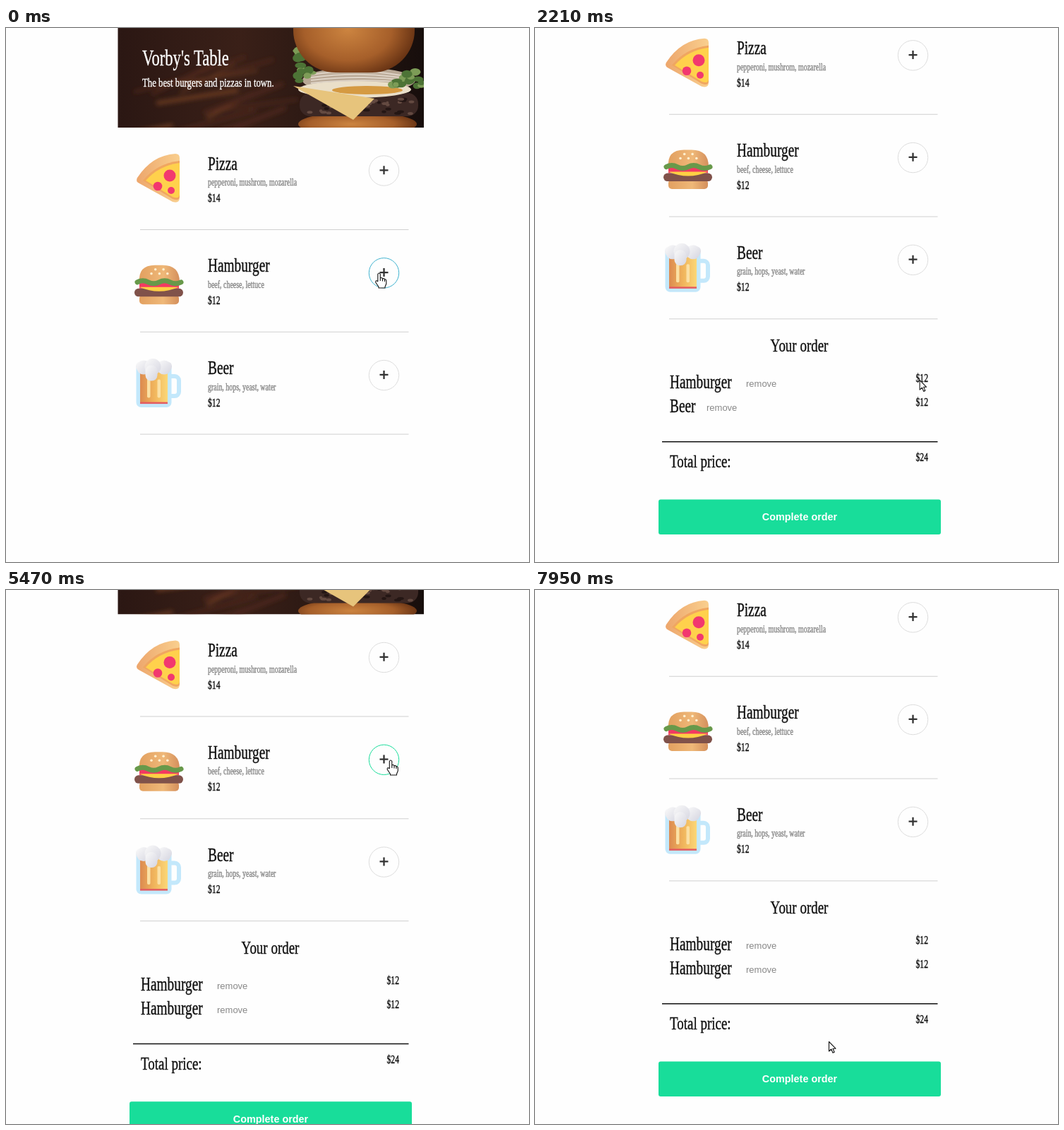
Write an HTML page that moves like this. It is 741 px wide and 756 px high and loops after 8000 ms.

```html
<!DOCTYPE html>
<html lang="en">
<head>
<meta charset="utf-8">
<title>Menu order</title>
<style>
  html, body { margin: 0; width: 100%; height: 100%; overflow: hidden; background: #fefefe; }
  svg { display: block; width: 741px; height: 756px; }
  .menu { font-family: "Liberation Serif", "Noto Serif", serif; stroke-width: .4px; }
  .ui { font-family: "Liberation Sans", Roboto, sans-serif; }
</style>
</head>
<body>
<svg viewBox="0 0 741 756" xmlns="http://www.w3.org/2000/svg">
  <defs>
    <linearGradient id="wood"><stop stop-color="#2b1713"/><stop offset=".4" stop-color="#3a2018"/><stop offset="1" stop-color="#170e0c"/></linearGradient>
    <radialGradient id="bun" cx=".45" cy=".5" r=".6"><stop stop-color="#cc8440"/><stop offset=".6" stop-color="#a65f2a"/><stop offset="1" stop-color="#5e2c10"/></radialGradient>
    <linearGradient id="crust"><stop stop-color="#eda66c"/><stop offset="1" stop-color="#f9cf8e"/></linearGradient>
    <linearGradient id="bread"><stop stop-color="#e2a060"/><stop offset=".6" stop-color="#efb878"/><stop offset="1" stop-color="#d48f5c"/></linearGradient>
    <linearGradient id="ale"><stop stop-color="#dc8a50"/><stop offset=".5" stop-color="#f0b45c"/><stop offset="1" stop-color="#fbd777"/></linearGradient>
    <linearGradient id="foam" x2="1" y2="1"><stop stop-color="#fafafa"/><stop offset="1" stop-color="#d5d5e0"/></linearGradient>
    <clipPath id="banner"><path d="M158.500 0H592V141H158.500z"/></clipPath>
    <filter id="soft"><feGaussianBlur stdDeviation="3"/></filter>
  </defs>
  <g id="page">
    <g id="photo" clip-path="url(#banner)"></g>
    <g id="heading"></g>
    <g id="rows"></g>
    <g id="order"></g>
  </g>
  <g id="cursor" fill="#fff" stroke="#111" stroke-width="1.100" stroke-linejoin="round">
    <path id="arrow" d="M.5 .5V14L3.700 11L6 16.300L8.200 15.300L6 10.200H10z"/>
    <path id="hand" d="M-1.700 12V1.500Q0-1.500 1.800 1.500V7Q4.500 5.800 5 8Q7.500 7 8 9Q10 8.500 10.300 10.500V15L8.500 19.500V21H-.5V19.500L-4.800 13Q-5 9-1.700 12M1.800 7V11M5 8V11.500M8 9V12"/>
  </g>
</svg>
<script>
const LOOP = 8000, VIEW = 756, ROW = 144.8, ITEM = 34.5;
const RING = { x: 535.5, y: 202, r: 21.2 };
const BUTTON = { x: 175, y: 796.25, w: 400, h: 49.5 };
const GREEN = '#18dd9a', DARK_GREEN = '#35896a', BLUE = '#3fb3d0';
const $ = id => document.getElementById(id);
const repeat = (n, draw) => Array.from({ length: n }, (_, i) => draw(i)).join('');

const path = (fill, d) => `<path fill="${fill}" d="${d}"/>`;
const rect = (fill, x, y, w, h, r = 0) =>
  `<rect fill="${fill}" x="${x}" y="${y}" width="${w}" height="${h}" rx="${r}"/>`;
const oval = (fill, x, y, rx, ry = rx) =>
  `<ellipse fill="${fill}" cx="${x}" cy="${y}" rx="${rx}" ry="${ry}"/>`;
const line = (x, y, color, width) =>
  `<path d="M${x} ${y}H570.5" stroke="${color}" stroke-width="${width}"/>`;
// One condensed display face for the whole menu.
const label = (x, y, size, text, color = '#111', anchor = 'start') =>
  `<text class="menu" transform="translate(${x} ${y}) scale(.73 1)" font-size="${size}" fill="${color}" stroke="${color}" text-anchor="${anchor}">${text}</text>`;

let seed = 7;
const random = () => (seed = seed * 16807 % 2147483647) / 2147483647;
const between = (a, b) => a + (b - a) * random();

function photo() {
  const streaks = repeat(14, i => {
    const x = between(150, 340), y = between(40, 165);
    return `<path d="M${x} ${y}l${between(60, 150)} ${-between(10, 45)}" stroke="${i % 3 ? '#4d281b' : '#6b3a20'}" stroke-width="${between(2, 6)}"/>`;
  });
  const leaves = (x, y, w, h) => repeat(16, i =>
    oval(i % 3 ? '#4d7336' : '#7d9c57', x + between(0, w), y + between(0, h), between(4, 8), between(3, 6)));
  const crumbs = repeat(40, i =>
    oval(i % 2 ? '#241614' : '#644a41', between(430, 575), between(100, 121), between(2, 5), 2));
  return rect('url(#wood)', 158, 0, 434, 141) + `<g filter="url(#soft)">${streaks}</g>` +
    oval('url(#bun)', 498, 136, 84, 17) + rect('#3c2824', 416, 92, 168, 33, 15) + crumbs +
    oval('#b9a895', 500, 74, 80, 18) + oval('#eadfc9', 494, 87, 80, 12) + oval('#d59a42', 512, 88, 50, 6) +
    path('#e7c47c', 'M407 82L522 100L492 130z') +
    `<g fill="none" stroke="#ded3c6" stroke-width="2">${repeat(4, i =>
      `<path d="M432 ${66 + 4 * i}Q500 ${56 + 5 * i} 566 ${68 + 3 * i}"/>`)}</g>` +
    leaves(412, 32, 22, 46) + leaves(535, 60, 56, 22) + rect('url(#bun)', 407, -58, 172, 121, 60);
}

function wavyBand(fill, x, y, w, h, waves) {
  const step = w / waves / 2;
  const swing = repeat(waves, () => `q${step / 2} -4 ${step} 0t${step} 0`);
  return `<path fill="none" stroke="${fill}" stroke-width="${h}" stroke-linecap="round" d="M${x} ${y}${swing}"/>`;
}

// Icons share the first row's coordinates.
const pizza = path('url(#crust)', 'M246 184Q246 178 240 178Q207 180 186 212Q183 217 189 220L236 246Q246 249 246 240z') +
  path('#f0a660', 'M246 188Q213 192 194 216L236 242Q246 246 246 238z') +
  path('#ffd14c', 'M246 191Q216 195 198 216L236 239Q246 243 246 235z') +
  oval('#f2386f', 232, 209, 8.5) + oval('#f2386f', 215, 224, 6.3) + oval('#f2386f', 234, 230, 5);
const burger = path('url(#bread)', 'M189 215Q187 191 211 191H222Q246 191 246 215z') +
  repeat(5, i => oval('#fff0d0', 206 + 5.7 * i, i % 2 ? 197 : 203, 1.8)) +
  rect('#f23a62', 189, 215, 56, 9) + wavyBand('#68994a', 186, 215, 62, 7, 2) +
  rect('url(#bread)', 189, 233, 56, 13.5, 5) + rect('#80524a', 182, 224, 69, 11.5, 5.7) +
  path('#ffd044', 'M189 222H245Q217 234 189 222z');
const beer = `<rect x="222" y="203.500" width="23" height="28" rx="6" fill="none" stroke="#c3e8fb" stroke-width="6"/>` +
  rect('#c3e8fb', 184.5, 186, 50, 61.5, 7) + rect('url(#ale)', 190, 195, 39, 47) + rect('#e35c62', 190, 240, 39, 2.5) +
  rect('#fbe0a4', 200, 195, 4.5, 39, 2) + rect('#fbe0a4', 214.5, 208, 4.5, 26, 2) +
  rect('url(#foam)', 184, 183, 51, 13, 6) + oval('url(#foam)', 195, 191, 10) + oval('url(#foam)', 224, 191, 10) +
  oval('url(#foam)', 208, 190, 11.5) + rect('url(#foam)', 197.5, 188, 17, 22, 8);

const menu = [
  ['Pizza', 'pepperoni, mushrom, mozarella', '$14', pizza],
  ['Hamburger', 'beef, cheese, lettuce', '$12', burger],
  ['Beer', 'grain, hops, yeast, water', '$12', beer]
];
$('photo').innerHTML = photo();
$('heading').innerHTML = label(193, 53, 31, "Vorby's Table", '#fff') +
  label(193, 83, 17.5, 'The best burgers and pizzas in town.', '#fff');
$('rows').innerHTML = repeat(menu.length, i => {
  const [name, detail, price, icon] = menu[i];
  return `<g transform="translate(0 ${i * ROW})">${icon}
    ${label(286, 200.5, 26.5, name)}${label(286, 223, 13.6, detail, '#858585')}${label(286, 246, 16, price)}
    <circle class="ring" cx="${RING.x}" cy="${RING.y}" r="${RING.r}" fill="none"/>
    <path d="M${RING.x - 6} ${RING.y - .7}h12m-6-6v12" stroke="#333" stroke-width="2.300"/>
    ${line(190, 285.5, '#d0d0d0', 1)}</g>`;
});
const rings = [...document.querySelectorAll('.ring')];

function orderMarkup(items) {
  if (!items.length) return '';
  const lines = repeat(items.length, i => `<g transform="translate(0 ${i * ITEM})">
    ${label(191, 673, 26.5, items[i])}${label(557, 664, 16, '$12', '#111', 'end')}
    <text class="ui" x="${items[i] === 'Beer' ? 243 : 299}" y="671" font-size="13" fill="#888">remove</text></g>`);
  return label(374.5, 621, 26, 'Your order', '#111', 'middle') + lines +
    `<g transform="translate(0 ${(items.length - 1) * ITEM})">
    ${line(180, 714.5, '#111', 1.7)}${label(191, 751, 26, 'Total price:')}
    ${label(557, 742, 16, '$' + 12 * items.length, '#111', 'end')}
    <g id="button">${rect('inherit', BUTTON.x, BUTTON.y, BUTTON.w, BUTTON.h, 3)}</g>
    <text class="ui" x="375" y="825.500" font-size="14.400" font-weight="700" fill="#fff" text-anchor="middle">Complete order</text></g>`;
}

// Each move: start, end, then where it arrives. Between moves nothing changes.
const cursorMoves = [
  [70, 140, 533, 337], [330, 760, 543, 479], [1180, 1440, 615, 450], [1960, 2410, 495, 532],
  [2480, 3200, 278, 538], [3420, 4080, 358, 620], [4150, 4420, 590, 713], [4450, 4880, 624, 232],
  [4960, 5180, 545, 241], [5560, 5750, 430, 652], [5820, 6580, 320, 709], [6650, 6740, 321, 729],
  [7190, 7330, 420, 690], [7410, 7550, 424, 616], [7830, 7950, 416, 639]
];
const scrollMoves = [[1660, 1950, 163.25], [3590, 3880, 106.5], [7083, 7373, 163.25]];
const orders = [[0], [280, 'Hamburger'], [1120, 'Hamburger', 'Beer'],
  [3310, 'Hamburger'], [5400, 'Hamburger', 'Hamburger']];

const smooth = p => p * p * (3 - 2 * p);
const easeOut = p => 1 - (1 - p) ** 2;
function follow(moves, origin, ease, t) {
  return moves.reduce((at, [start, end, ...goal]) => {
    const p = ease(Math.min(1, Math.max(0, (t - start) / (end - start))));
    return at.map((v, i) => v + (goal[i] - v) * p);
  }, origin);
}

let shown;
function render(t) {
  const [, ...items] = orders.filter(o => o[0] <= t).pop();
  if (shown !== items.join()) {
    shown = items.join();
    $('order').innerHTML = orderMarkup(items);
  }
  const extra = (items.length - 1) * ITEM;
  const maxScroll = items.length ? BUTTON.y + BUTTON.h + 39 + extra - VIEW : 0;
  const scroll = Math.min(maxScroll, follow(scrollMoves, [0], easeOut, t)[0]);
  const [x, y] = follow(cursorMoves, [528.5, 347], smooth, t);
  $('page').setAttribute('transform', `translate(0 ${-scroll})`);

  let pointing = false;
  rings.forEach((ring, i) => {
    const over = Math.hypot(x - RING.x, y + scroll - RING.y - i * ROW) < RING.r;
    pointing = pointing || over;
    ring.setAttribute('stroke', over ? (t < 280 ? BLUE : GREEN) : '#ddd');
  });
  if (items.length) {
    const down = y + scroll - BUTTON.y - extra;
    const over = x > BUTTON.x && x < BUTTON.x + BUTTON.w && down > 0 && down < BUTTON.h;
    pointing = pointing || over;
    $('button').firstChild.setAttribute('fill', over ? DARK_GREEN : GREEN);
  }
  $('cursor').setAttribute('transform', `translate(${x} ${y})`);
  $('hand').setAttribute('visibility', pointing ? 'visible' : 'hidden');
  $('arrow').setAttribute('visibility', pointing ? 'hidden' : 'visible');
}

const start = performance.now();
function tick() {
  render((performance.now() - start) % LOOP);
  requestAnimationFrame(tick);
}
tick();
</script>
</body>
</html>
```
